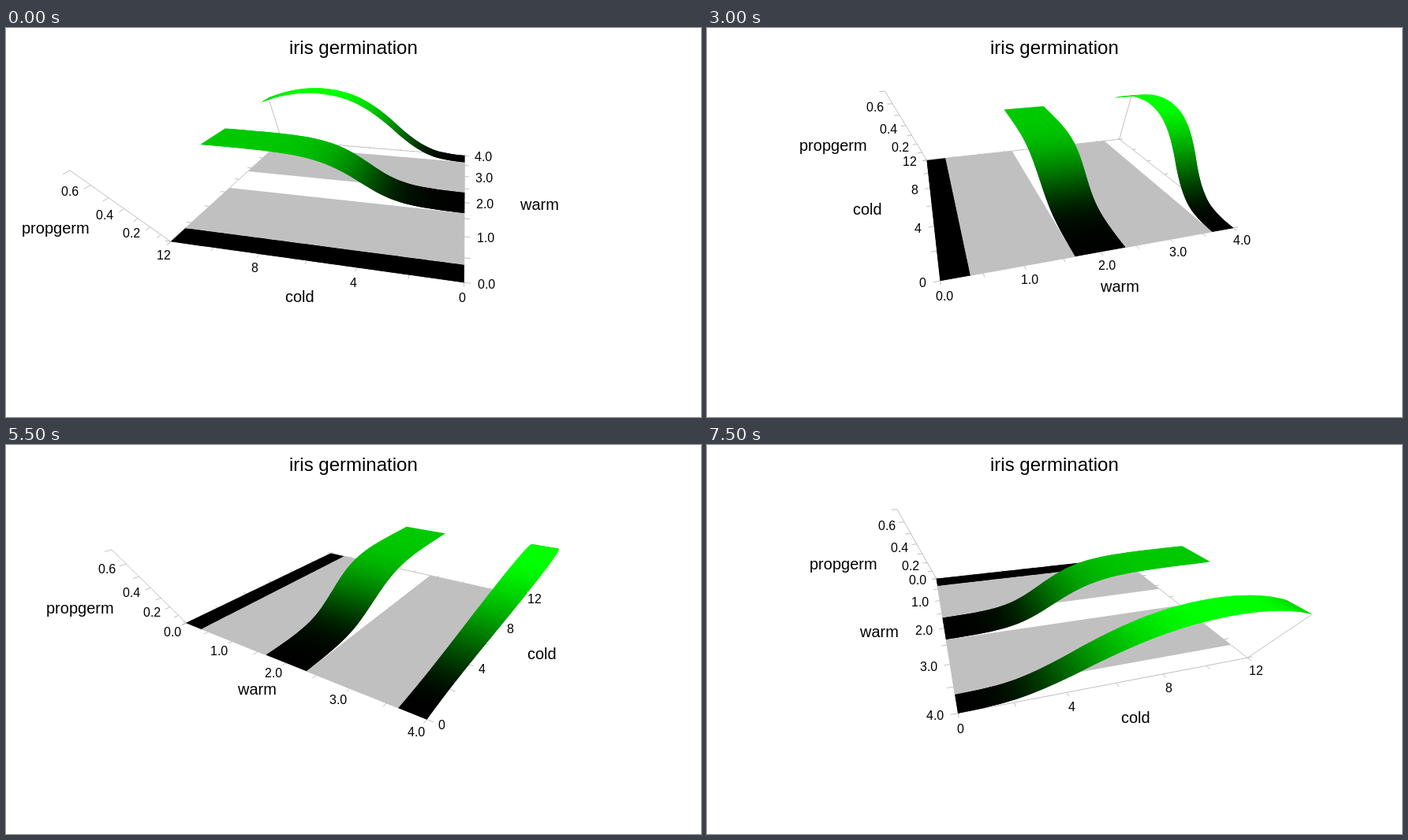
An HTML page with a canvas that plays this animation: 881 px wide and 494 px high, repeating every 8 s.

```html
<!DOCTYPE html>
<html lang="en">
<head>
<meta charset="utf-8">
<title>Rotating surface plot</title>
<style>
html, body { margin: 0; width: 100%; height: 100%; overflow: hidden; background: #fff; }
canvas { display: block; }
</style>
</head>
<body>
<canvas id="stage" width="881" height="494"></canvas>
<script>
const ctx = document.getElementById('stage').getContext('2d');
const FONT = '"Liberation Sans", Arial, sans-serif';
const GRAY = '#c0c0c0';
const LOOP = 8000, STEP = 500;
const HALF = 0.345;            // half width of a ribbon in warm units
const TOP = 0.7;               // end of the height axis
const PEAK = [0, .01, .045, .125, .24, .375, .49, .568, .606, .614, .596, .556, .498];

let sin, cos, angle;

// Data space (cold, warm, height) to screen
function floorPoint(c, w) {
  const u = -134 + 291 * c / 12, v = -147 + 306.5 * w / 4;
  return { x: v * cos - u * sin, depth: 1 + (u * cos + v * sin - 13.5) / 615 };
}

function project(c, w, h = 0) {
  const p = floorPoint(c, w), t = 0.407 * h, d = p.depth - t;
  return { x: 440.5 + p.x / d, y: (273 - 69 * p.depth - 435 * t) / d, depth: p.depth };
}

// Heights along the cold axis
const flat = () => 0;
const sigmoid = c => 0.474 / (1 + Math.exp((5 - c) / 0.95));

function hump(c) {
  const i = Math.min(11, Math.floor(c)), f = c - i;
  const at = k => PEAK[Math.max(0, Math.min(12, k))];
  const a = at(i - 1), b = at(i), d = at(i + 1);
  const e = i === 11 ? 2 * d - b : at(i + 2);
  return b + f / 2 * (d - a + f * (2 * a - 5 * b + 4 * d - e + f * (3 * (b - d) + e - a)));
}

const ribbons = [
  { from: 0, to: HALF, height: flat },
  { from: 2 - HALF, to: 2 + HALF, height: sigmoid },
  { from: 4 - HALF, to: 4, height: hump }
];

function polygon(points, color) {
  ctx.beginPath();
  points.forEach(p => ctx.lineTo(p.x, p.y));
  ctx.closePath();
  ctx.fillStyle = color;
  ctx.fill();
}

function line(a, b) {
  ctx.strokeStyle = GRAY;
  ctx.lineWidth = 1;
  ctx.beginPath();
  ctx.moveTo(a.x, a.y);
  ctx.lineTo(b.x, b.y);
  ctx.stroke();
}

function label(text, x, y, size) {
  ctx.font = size + 'px ' + FONT;
  const width = ctx.measureText(text).width;
  const base = Math.round(y + size * 0.36), left = Math.round(x - width / 2);
  ctx.fillStyle = '#fff';
  ctx.fillRect(left, base - Math.round(size * 0.92), width, Math.round(size * 1.12));
  ctx.fillStyle = '#000';
  ctx.fillText(text, left, base);
}

// Outward directions on screen: x to the right, y away from the viewer
const alongCold = s => ({ x: -s * sin, y: s * cos });
const alongWarm = s => ({ x: s * cos, y: s * sin });

function tickLabel(text, p, g) {
  ctx.font = '16px ' + FONT;
  const half = ctx.measureText(text).width / 2;
  const gap = 14.5 + (1 - p.depth) * 12 * g.x * g.x;
  const spread = (440.5 - p.x) * g.y * 0.016;
  label(text, p.x + g.x * (gap + half) + spread, p.y + g.y * g.y * 13.8 / p.depth + 0.7, 16);
}

function axisTitle(text, p, g) {
  const bend = 17 * Math.sign(g.x) * Math.pow(g.x, 8);
  const shift = Math.min(10, Math.max(0, -g.x * 50));
  label(text, p.x + 84 * g.x + bend + shift, p.y + 48 * g.y * g.y - 0.5, 20);
}

function drawFloor() {
  polygon([[12, HALF], [0, HALF], [0, 2 - HALF], [12, 2 - HALF]].map(q => project(...q)), GRAY);
  polygon([[12, 2 + HALF], [0, 2 + HALF], [0, 4 - HALF], [12, 4 - HALF]].map(q => project(...q)), GRAY);
  const corners = [[0, 0], [12, 0], [12, 4], [0, 4]].map(q => project(...q));
  corners.forEach((p, i) => line(p, corners[(i + 1) % 4]));
  const tickC = 6 * 12 / 291, tickW = 6 * 4 / 306.5;
  for (let c = 0; c <= 12; c += 2) {
    line(project(c, 0), project(c, -tickW));
    line(project(c, 4), project(c, 4 + tickW));
  }
  for (let w = 0; w <= 4; w += 0.5) {
    line(project(0, w), project(-tickC, w));
    line(project(12, w), project(12 + tickC, w));
  }
  line(project(12, 4), project(12, 4, hump(12)));

  // height axis stands on the leftmost corner
  const c0 = angle > 0 ? 12 : 0;
  line(project(c0, 0), project(c0, 0, TOP));
  for (let i = 0; i <= 7; i++) {
    const end = angle > 0 ? project(12, -tickW, i / 10) : project(-tickC, 0, i / 10);
    line(project(c0, 0, i / 10), end);
  }
}

// Far to near; each piece reaches under the next so no seams show
function drawRibbon({ from, to, height }) {
  const size = 12 / 96;
  for (let a = 12; a > 0; a -= size) {
    const b = Math.max(0, a - 2 * size);
    const ha = height(a), hb = height(b);
    const green = Math.min(255, Math.round(255 * height(a - size / 2) / 0.6));
    polygon([project(a, from, ha), project(a, to, ha), project(b, to, hb), project(b, from, hb)],
      `rgb(0,${green},0)`);
  }
}

function drawLabels() {
  const c0 = angle > 0 ? 12 : 0, edge = angle > 0 ? 0 : 4;
  const outCold = alongWarm(angle > 0 ? -1 : 1), outWarm = alongCold(-1);
  for (const h of [0.2, 0.4, 0.6]) {
    const p = project(c0, 0, h);
    label(h.toFixed(1), p.x * 1.027 - 28.8, p.y + 5.5 + (1 - p.depth) * 10, 16);
  }
  for (let c = 0; c <= 12; c += 4) tickLabel(String(c), project(c, edge), outCold);
  for (let w = 0; w <= 4; w++) tickLabel(w.toFixed(1), project(0, w), outWarm);

  const mid = project(c0, 0, TOP / 2);
  label('propgerm', mid.x - 96.3, mid.y + 18.5, 20);
  axisTitle('cold', project(6, edge), outCold);
  axisTitle('warm', project(0, 2), outWarm);
}

function draw(time) {
  angle = 77 - 10 * Math.floor((time % LOOP) / STEP);
  sin = Math.sin(angle * Math.PI / 180);
  cos = Math.cos(angle * Math.PI / 180);
  ctx.fillStyle = '#fff';
  ctx.fillRect(0, 0, 881, 494);
  drawFloor();
  (angle > 0 ? [...ribbons].reverse() : ribbons).forEach(drawRibbon);
  drawLabels();
  label('iris germination', 440, 24.5, 24);
}

const start = performance.now();
function loop() {
  draw(performance.now() - start);
  requestAnimationFrame(loop);
}
loop();
</script>
</body>
</html>
```
